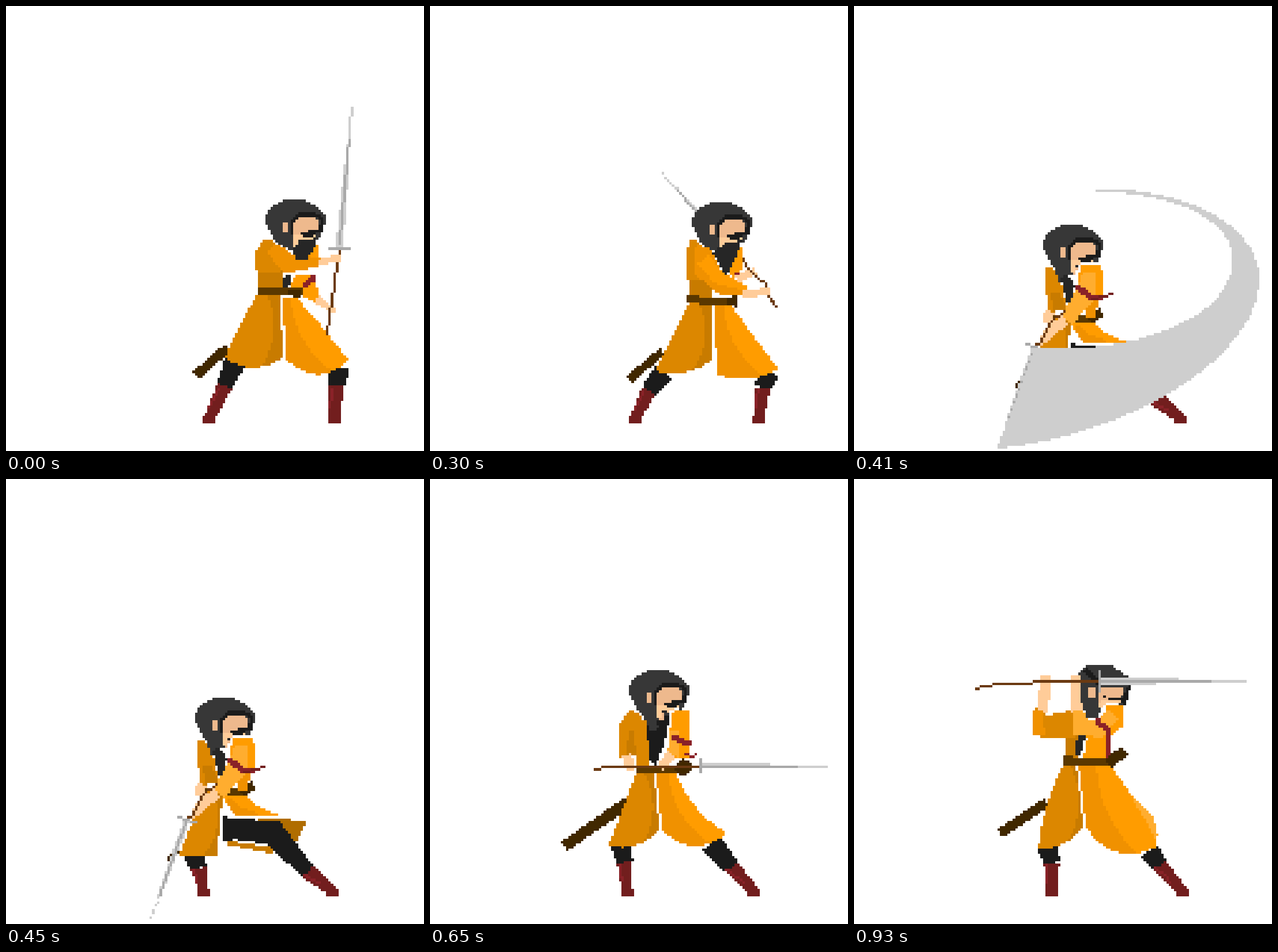
Recreate the animation shown at these times as an HTML page with a canvas. Size 725 px wide and 773 px high, loop 1050 ms.

```html
<!DOCTYPE html>
<html lang="en">
<head>
<meta charset="utf-8">
<title>Swordsman</title>
<style>
html, body { margin: 0; height: 100%; overflow: hidden; background: #fff; }
canvas { display: block; width: 100vw; height: 100vh; image-rendering: pixelated; }
</style>
</head>
<body>
<canvas id="stage" width="166" height="177"></canvas>
<script>
const ctx = document.getElementById('stage').getContext('2d');
const COLS = 166, ROWS = 177, CELL = 725 / COLS;
const ORANGE = '#ff9c00', WARM = '#f09100', OCHRE = '#dc8700', DEEP = '#c87b00', LIGHT = '#ffad2f', SHADOW = '#b06d00';
const SKIN = '#ffcc99', TAN = '#eeb98d', HOOD = '#373737', BEARD = '#262626', BLACK = '#1b1b1b';
const BOOT = '#721e1e', RED = '#8a2228', BELT = '#5a3800', SHEATH = '#412800', POLE = '#6b3a12';
const STEEL = '#a9a9a9', SILVER = '#cecece', WHITE = '#fff';
let shiftX = 0, shiftY = 0;

const mix = (p, q, k) => [p[0] + (q[0] - p[0]) * k, p[1] + (q[1] - p[1]) * k];

function normal(p, q) {
  const x = q[0] - p[0], y = q[1] - p[1], len = Math.hypot(x, y) || 1;
  return [y / len, -x / len];
}

function bezier(a, b, c, d) {
  return Array.from({ length: 25 }, (_, i) => {
    const k = i / 24, ab = mix(a, b, k), bc = mix(b, c, k), cd = mix(c, d, k);
    return mix(mix(ab, bc, k), mix(bc, cd, k), k);
  });
}

// Edge from p to q whose middle is pushed sideways by bulge.
function arc(p, q, bulge = 0) {
  const [nx, ny] = normal(p, q);
  const push = ([x, y]) => [x + nx * bulge * 4 / 3, y + ny * bulge * 4 / 3];
  return bezier(p, push(mix(p, q, 1 / 3)), push(mix(p, q, 2 / 3)), q);
}

// Cell-centre scanline fill keeps every edge stepped.
function fill(color, points) {
  ctx.fillStyle = color;
  for (let row = 0; row < ROWS; row++) {
    const y = (row + 0.5) * CELL, hits = [];
    points.forEach(([x1, y1], i) => {
      const [x2, y2] = points[(i + 1) % points.length];
      if (y1 <= y !== y2 <= y) hits.push(Math.round((x1 + (y - y1) / (y2 - y1) * (x2 - x1)) / CELL));
    });
    hits.sort((a, b) => a - b);
    for (let i = 0; i + 1 < hits.length; i += 2) {
      ctx.fillRect(hits[i] + shiftX, row + shiftY, hits[i + 1] - hits[i], 1);
    }
  }
}

const shape = (color, ...points) => fill(color, points);

// Tapered stroke through joints [x, y, width].
function limb(color, ...joints) {
  const sides = joints.map((j, i) => {
    const [nx, ny] = normal(joints[Math.max(0, i - 1)], joints[Math.min(joints.length - 1, i + 1)]);
    const r = j[2] / 2;
    return [[j[0] + nx * r, j[1] + ny * r], [j[0] - nx * r, j[1] - ny * r]];
  });
  for (let i = 1; i < sides.length; i++) {
    fill(color, [...sides[i - 1], sides[i][1], sides[i][0]]);
  }
}

function line(color, width, ...points) {
  ctx.fillStyle = color;
  const cells = points.map(p => p.map(v => v / CELL - (width - 1) / 2));
  for (let i = 1; i < cells.length; i++) {
    const [p, q] = [cells[i - 1], cells[i]];
    const steps = Math.max(1, Math.ceil(Math.max(Math.abs(q[0] - p[0]), Math.abs(q[1] - p[1]))));
    for (let s = 0; s <= steps; s++) {
      const [x, y] = mix(p, q, s / steps);
      ctx.fillRect(Math.floor(x) + shiftX, Math.floor(y) + shiftY, width, width);
    }
  }
}

function box(color, ...edges) {
  const [l, t, r, b] = edges.map(v => Math.round(v / CELL));
  ctx.fillStyle = color;
  ctx.fillRect(l + shiftX, t + shiftY, r - l, b - t);
}

function boot(knee, footX) {
  limb(BOOT, [...knee, 27], [footX + 12, 716, 18]);
  line(RED, 1, [knee[0] - 8, knee[1] + 4], mix(knee, [footX, 712], 0.7));
  box(BOOT, footX, 712, footX + 23, 725);
}

function leg(hip, knee, footX) {
  limb(BLACK, [...hip, 38], [...knee, 28]);
  boot(knee, footX);
}

// Half a coat skirt: slit edge, curved hem, outer edge, and a shade beside the slit.
function skirt(slitTop, slitLow, hem, waist, hemBulge, sideBulge = 0) {
  const left = hem[0] < slitLow[0], side = left ? 1 : -1;
  const low = arc(slitLow, hem, hemBulge * side);
  fill(left ? OCHRE : ORANGE, [slitTop, ...low, ...arc(hem, waist, sideBulge * side)]);
  const part = low.slice(0, left ? 10 : 19);
  fill(left ? DEEP : WARM, [slitTop, ...part, ...arc(part.at(-1), mix(slitTop, waist, 0.6), -17 * side)]);
}

function sword(width, tip, guard, ...pole) {
  const at = k => mix(guard, tip, k), [nx, ny] = normal(guard, tip), reach = width * 1.35;
  line(POLE, 1, ...pole, guard);
  limb(SILVER, [...guard, width], [...at(0.4), width * 0.75], [...at(0.78), 4]);
  line(STEEL, 1, at(0.03), at(0.78));
  const slanted = Math.min(Math.abs(tip[0] - guard[0]), Math.abs(tip[1] - guard[1])) > 40;
  if (slanted) for (let k = 0.78; k <= 1; k += 0.04) line(SILVER, 1, at(k), at(k));
  else line(SILVER, 1, at(0.78), tip);
  line(STEEL, 1, [guard[0] + nx * reach, guard[1] + ny * reach], [guard[0] - nx * reach, guard[1] - ny * reach]);
}

function head(col, row) {
  shiftX = col;
  shiftY = row;
  line(WHITE, 1, [462, 406], [474, 413], [490, 420]);
  shape(HOOD, [484, 336], [515, 336], [538, 347], [555, 363], [553, 380], [545, 402], [497, 424], [468, 412], [461, 398], [450, 376], [450, 364], [464, 346]);
  shape(TAN, [497, 376], [506, 365], [538, 364], [542, 390], [515, 400], [508, 426], [497, 418]);
  box(TAN, 482, 376, 491, 393);
  limb(BLACK, [495, 396, 5], [494, 379, 6], [505, 364, 7], [535, 361, 7], [549, 372, 8], [545, 394, 8]);
  shape(SKIN, [497, 396], [541, 400], [537, 407], [509, 409], [506, 420], [497, 416]);
  box(BLACK, 510, 393, 537, 398);
  box(BLACK, 524, 389, 545, 394);
  box(BLACK, 515, 398, 532, 402);
  box(BEARD, 506, 406, 515, 411);
  shiftX = shiftY = 0;
}

function windup() {
  limb(SHEATH, [386, 592, 16], [329, 642, 17]);
  leg([398, 616], [379, 660], 341);
  leg([578, 626], [573, 660], 558);
  skirt([476, 500], [480, 610], [380, 612], [437, 500], 17, 3);
  skirt([480.5, 505], [485, 612], [594, 616], [502, 505], 26, 2);
  limb(DEEP, [459, 450, 46], [459, 492, 46]);
  limb(BEARD, [489, 467, 12], [485, 490, 9]);
  shape(ORANGE, [502, 466], [537, 468], [541, 505], [535, 515], [490, 490]);
  limb(ORANGE, [539, 414, 6], [528, 445, 30]);
  limb(OCHRE, [455, 406, 18], [453, 430, 42], [455, 462, 40]);
  limb(WARM, [462, 420, 26], [488, 448, 36], [545, 444, 15]);
  line(RED, 2, [518, 483], [535, 471]);
  limb(BELT, [437, 495, 12], [480, 496, 12], [514, 496, 10]);
  limb(SHEATH, [488, 499, 8], [510, 499, 14]);
  limb(SKIN, [539, 509, 14], [571, 533, 9]);
  head(0, 0);
  shape(BEARD, [506, 411], [537, 403], [536, 420], [522, 440], [502, 440], [497, 424]);
  sword(13, [600, 175], [578, 421], [557, 571]);
  limb(SKIN, [542, 446, 12], [580, 437, 12]);
}

function coil() {
  sword(10, [404, 290], [508, 408], [520, 420]);
  limb(SHEATH, [403, 600, 14], [346, 648, 15]);
  leg([406, 636], [379, 668], 345);
  leg([587, 636], [577, 664], 558);
  skirt([489, 514], [489, 614], [390, 634], [450, 514], 13);
  skirt([493.5, 516], [497, 640], [603, 630], [519, 516], 13);
  limb(DEEP, [470, 462, 40], [470, 510, 40]);
  limb(DEEP, [492, 480, 10], [492, 492, 10]);
  shape(ORANGE, [541, 415], [541, 455], [524, 472], [512, 455]);
  box(RED, 528, 463, 537, 470);
  limb(OCHRE, [458, 406, 14], [460, 432, 32], [462, 476, 32]);
  limb(WARM, [470, 416, 26], [478, 455, 42], [505, 486, 32], [550, 495, 12]);
  limb(ORANGE, [474, 440, 24], [500, 472, 24], [550, 492, 8]);
  limb(BELT, [445, 508, 13], [490, 514, 13], [534, 511, 13]);
  limb(SHEATH, [514, 513, 12], [533, 513, 20]);
  head(1, 1);
  shape(BEARD, [490, 428], [514, 412], [540, 407], [530, 440], [514, 470]);
  limb(SKIN, [532, 475, 14], [565, 460, 13]);
  line(POLE, 1, [543, 438], [550, 454], [582, 484], [592, 512], [600, 522]);
  limb(SKIN, [541, 501, 12], [589, 496, 13]);
}

// Coat tail swept behind the back leg, trimmed in white.
function tail(end, low, sag) {
  fill(ORANGE, [[378, 545], ...arc([412, 547], end, -sag), low, [383, 570]]);
  limb(WARM, [385, 555, 10], [mix([378, 545], low, 0.7)[0] + 6, 576, 16], [low[0] + 35, low[1] - 6, 6]);
  line(WHITE, 1, [378, 548], [381, 568], low, end);
}

function lungeLegs() {
  limb(DEEP, [384, 632, 8], [465, 646, 10]);
  limb(BLACK, [374, 608, 44], [400, 608, 36], [462, 614, 46], [524, 682, 26]);
  boot([524, 682], 553);
  leg([326, 648], [334, 676], 331);
}

function lungeBody(slitLow) {
  skirt([376, 540], slitLow, [300, 655], [345, 540], 0);
  limb(OCHRE, [341, 455, 18], [344, 475, 28], [354, 529, 30]);
  limb(DEEP, [349, 498, 14], [357, 529, 26]);
  limb(SHEATH, [408, 547, 11], [430, 532, 16]);
  limb(HOOD, [353, 435, 26], [364, 478, 16]);
  head(-28, 10);
  limb(BEARD, [362, 470, 10], [373, 484, 22], [373, 520, 5]);
}

function collar() {
  line(WHITE, 1, [384, 484], [388, 466], [390, 452], [398, 447], [428, 447]);
}

function strike() {
  shape(SHADOW, [435, 590], [523, 592], [497, 642], [465, 612]);
  lungeLegs();
  limb(SHEATH, [299, 646, 8], [281, 662, 11]);
  tail([518, 590], [400, 588], 12);
  limb(BELT, [345, 542, 14], [412, 543, 12]);
  lungeBody([366, 657]);
  limb(SKIN, [340, 530, 18], [333, 550, 13]);
  limb(WARM, [412, 500, 26], [410, 540, 18]);
  limb(ORANGE, [412, 449, 32], [411, 466, 44], [411, 504, 42]);
  limb(LIGHT, [408, 464, 24], [404, 498, 36], [368, 547, 24]);
  collar();
  line(RED, 2, [387, 490], [412, 505], [430, 506]);
  line(BOOT, 1, [412, 508], [440, 504], [448, 499]);
  limb(SKIN, [366, 545, 20], [338, 568, 18], [323, 588, 8]);
  sword(11, [251, 765], [314, 592], [363, 530], [340, 552], [322, 586]);
}

function sweep() {
  strike();
  fill(SILVER, [
    ...bezier([419, 319], [560, 312], [703, 375], [703, 475]),
    ...bezier([703, 475], [703, 600], [500, 740], [249, 769]),
    ...bezier([313, 594], [480, 605], [657, 545], [657, 440]),
    ...bezier([657, 440], [657, 375], [560, 323], [419, 323])
  ]);
  line(STEEL, 1, [307, 591], [316, 591]);
}

function follow() {
  shape(SHADOW, [485, 614], [519, 603], [517, 620], [500, 642]);
  lungeLegs();
  limb(SHEATH, [300, 645, 12], [281, 660, 12]);
  tail([518, 602], [425, 616], 20);
  lungeBody([354, 656]);
  limb(BELT, [345, 536, 14], [384, 536, 14]);
  limb(SKIN, [333, 523, 18], [334, 554, 20]);
  limb(ORANGE, [412, 449, 32], [411, 466, 44], [409, 500, 46], [394, 547, 30]);
  limb(LIGHT, [407, 464, 24], [402, 500, 36], [390, 545, 26]);
  collar();
  line(WHITE, 1, [384, 484], [376, 522]);
  line(RED, 2, [396, 502], [412, 505], [432, 512]);
  line(BOOT, 1, [434, 513], [448, 504]);
  limb(SKIN, [386, 546, 28], [366, 577, 14]);
  sword(10, [563, 737], [383, 588], [316, 526], [332, 542]);
}

function guard() {
  limb(SHEATH, [346, 560, 20], [233, 638, 19]);
  leg([332, 636], [338, 666], 330);
  leg([488, 632], [523, 674], 550);
  skirt([388, 510], [398, 606], [310, 637], [358, 510], 15);
  skirt([392.5, 510], [402.5, 610], [515, 616], [427, 510], 24, -12);
  shape(BLACK, [370, 410], [416, 405], [408, 460], [393, 497], [380, 490]);
  limb(OCHRE, [368, 420, 14], [369, 498, 24]);
  limb(OCHRE, [353, 404, 18], [350, 428, 44], [352, 482, 46]);
  limb(DEEP, [350, 435, 8], [348, 480, 18]);
  limb(SKIN, [341, 480, 18], [350, 506, 14]);
  limb(HOOD, [372, 392, 24], [390, 436, 14]);
  head(-24, -1);
  limb(ORANGE, [434, 402, 28], [432, 430, 36], [431, 486, 38]);
  limb(LIGHT, [425, 436, 16], [421, 482, 20]);
  line(WHITE, 1, [430, 399], [417, 404], [417, 428], [408, 460], [397, 492]);
  line(RED, 2, [422, 450], [448, 460]);
  line(RED, 1, [443, 479], [454, 483], [461, 478]);
  limb(BELT, [358, 504, 13], [430, 505, 12]);
  limb(SHEATH, [425, 504, 12], [440, 501, 32], [454, 499, 12]);
  limb(SKIN, [420, 478, 20], [400, 502, 14]);
  sword(9, [688, 498.5], [468, 498.5], [286, 504], [310, 500], [405, 500]);
}

function raise() {
  limb(SHEATH, [334, 562, 18], [253, 616, 17]);
  leg([336, 638], [343, 668], 330);
  leg([512, 646], [530, 671], 558);
  skirt([385, 493], [398, 605], [320, 643], [365, 493], 10, 8);
  skirt([389.5, 493], [402.5, 605], [527, 638], [440, 493], 28, 7);
  limb(LIGHT, [484, 556, 4], [512, 590, 14], [525, 622, 6]);
  limb(DEEP, [378, 442, 24], [378, 488, 24]);
  limb(ORANGE, [420, 446, 42], [421, 488, 44]);
  limb(BEARD, [394, 446, 14], [389, 480, 9]);
  line(WHITE, 1, [402, 452], [397, 478]);
  limb(SKIN, [332, 341, 19], [328, 404, 18]);
  shape(OCHRE, [314, 398], [335, 410], [380, 402], [385, 452], [312, 447]);
  limb(WARM, [320, 400, 18], [320, 446, 20]);
  shape(HOOD, [405, 323], [445, 323], [475, 343], [481, 358], [466, 391], [428, 400], [420, 417], [404, 414], [389, 370], [389, 340]);
  limb(BLACK, [400, 330, 6], [422, 352, 14], [479, 355, 14], [466, 391, 10]);
  shape(TAN, [424, 361], [468, 361], [464, 380], [428, 398], [422, 388]);
  box(TAN, 408, 361, 419, 378);
  shape(SKIN, [428, 382], [465, 386], [440, 396], [424, 396]);
  box(BLACK, 441, 380, 468, 384);
  box(BLACK, 433, 376, 438, 380);
  limb(SKIN, [384, 341, 17], [386, 404, 20]);
  limb(ORANGE, [432, 436, 32], [454, 420, 34], [451, 393, 28]);
  limb(LIGHT, [386, 402, 18], [394, 430, 36], [425, 436, 30], [450, 408, 24]);
  line(WHITE, 1, [434, 394], [442, 390], [457, 390]);
  line(RED, 2, [422, 418], [440, 438], [442, 480]);
  limb(BELT, [363, 489, 14], [440, 491, 12]);
  limb(SHEATH, [440, 496, 18], [469, 472, 20]);
  sword(13, [681, 351], [424, 351], [212, 364], [248, 357], [308, 355], [314, 351]);
}

const poses = [[300, windup], [350, coil], [450, sweep], [550, strike], [650, follow], [750, guard], [1050, raise]];
const start = performance.now();
let shown;

function tick() {
  const t = (performance.now() - start) % 1050;
  const pose = poses.find(([end]) => t < end)[1];
  if (pose !== shown) {
    shown = pose;
    ctx.fillStyle = WHITE;
    ctx.fillRect(0, 0, COLS, ROWS);
    pose();
  }
  requestAnimationFrame(tick);
}
tick();
</script>
</body>
</html>
```
